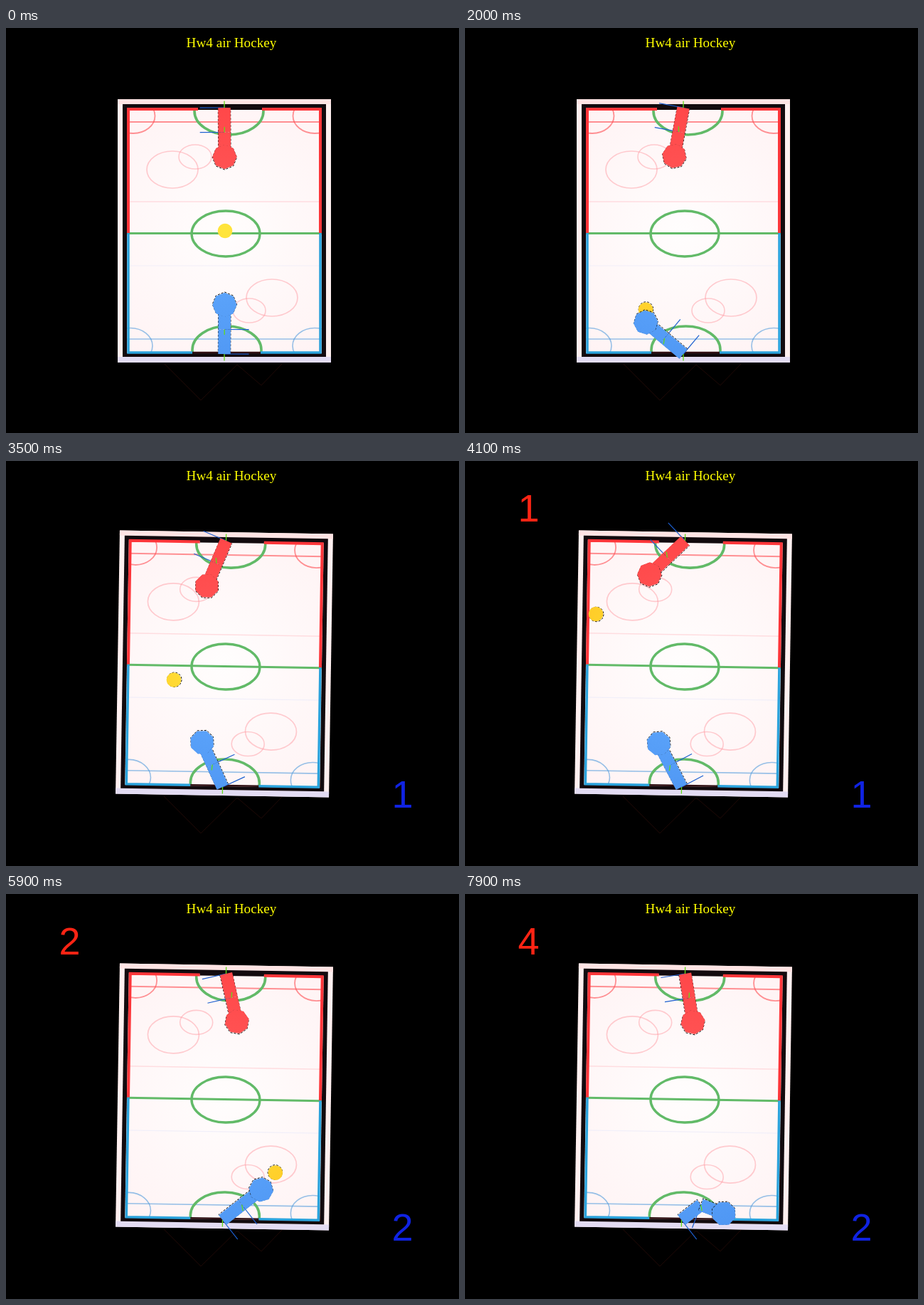
These frames come from a looping animation (637x569 px, 8000 ms). An HTML page with a canvas:

```html
<!DOCTYPE html>
<html lang="en">
<head>
<meta charset="utf-8">
<title>Air Hockey</title>
<style>
html, body { margin: 0; width: 100%; height: 100%; overflow: hidden; background: #000; }
canvas { display: block; }
</style>
</head>
<body>
<canvas id="stage" width="637" height="569"></canvas>
<script>
const ctx = document.getElementById('stage').getContext('2d');
const LOOP = 8000, STEP = 100, LINK = 34.5, LAG = 0.15;
const MID = { x: 307, y: 285 };

// Each shot runs straight and bounces off the walls until the next one starts.
const shot = (step, x, y, vx, vy) => ({ step, x, y, vx, vy });
const faceOff = (step, vx, vy) => shot(step, 308, 285, vx, vy);
const SHOTS = [
  faceOff(0, 0, 0),
  faceOff(12, 41.5, -57.7),
  shot(19.85, 251, 411, 20.6, -101.5),
  faceOff(30, -36, -69.7),
  faceOff(37, -32, 99.5),
  shot(42, 217, 122, 17, 108),
  faceOff(48, 9, 130.5),
  shot(51, 335, 221, 46.6, -85),
  faceOff(56, 23.6, 73.8),
  faceOff(67, -108, -224),
  shot(68, 200, 183, -24, 44),
  faceOff(74, 12, -104),
  shot(78.7, 364, 449, 0, 0)
];
const RED_GOALS = [37, 56, 67, 74], BLUE_GOALS = [30, 48];
const TILT_STEP = 21, TILT = 0.016;

function bounce(v, low, high) {
  const span = high - low, m = (((v - low) % (2 * span)) + 2 * span) % (2 * span);
  return low + (m > span ? 2 * span - m : m);
}

function puckAt(step) {
  const s = SHOTS.filter(s => s.step <= step).pop() || SHOTS[0];
  const t = step - s.step;
  return { x: bounce(s.x + s.vx * t, 182, 440), y: bounce(s.y + s.vy * t, 122, 449) };
}

function glow(inner, outer) {
  const g = ctx.createRadialGradient(MID.x, MID.y, 0, MID.x, MID.y, 220);
  g.addColorStop(0, inner);
  g.addColorStop(1, outer);
  return g;
}
const RED = glow('#ff5c5c', '#ff4244');
const BLUE = glow('#64acff', '#4c94f2');
const YELLOW = glow('#ffe53c', '#ffc220');
const ICE = glow('#fffdfd', '#fff3f4');

function rect(color, x1, y1, x2, y2) {
  ctx.fillStyle = color;
  ctx.fillRect(x1, y1, x2 - x1, y2 - y1);
}

function line(color, width, ...pts) {
  ctx.strokeStyle = color;
  ctx.lineWidth = width;
  ctx.beginPath();
  for (let i = 0; i < pts.length; i += 2) ctx.lineTo(pts[i], pts[i + 1]);
  ctx.stroke();
}

function ring(color, width, x, y, rx, ry) {
  ctx.strokeStyle = color;
  ctx.lineWidth = width;
  ctx.beginPath();
  ctx.ellipse(x, y, rx, ry, 0, 0, Math.PI * 2);
  ctx.stroke();
}

function drawMarkings() {
  const pink = 'rgba(255,150,160,.48)', red = 'rgba(255,75,80,.6)';
  const sky = 'rgba(80,155,220,.6)', green = '#62ba68';
  const across = (color, width, y) => line(color, width, 170, y, 444, y);
  ctx.save();
  ctx.beginPath();
  ctx.rect(170, 113, 274, 344);
  ctx.clip();
  across('#ffdde0', 1.5, 244);
  across('#f1eff9', 1.2, 334);
  across(red, 2, 132);
  across(sky, 1.6, 437);
  for (const x of [179, 434]) ring(red, 1.8, x, 123.5, 30.5, 24.5);
  for (const x of [175, 434]) ring(sky, 1.6, x, 446.5, 31, 25);
  across(green, 3, 288.5);
  ring(green, 3.4, 309, 289, 48, 32);
  for (const s of [1, -1]) {
    ring(pink, 1.7, 304 - 70 * s, 289 - 90 * s, 36, 26);
    ring(pink, 1.6, 304 - 38 * s, 289 - 108 * s, 23, 17);
    ring(green, 3.6, 312 + 1.5 * s, 284.5 - 167.5 * s, 48.5, 33);
  }
  ctx.restore();
}

function drawTable(tilted) {
  const black = '#120a0e', edge = '#ff363a', shore = '#2ba3dc';
  ctx.save();
  if (tilted) {
    ctx.translate(MID.x, MID.y);
    ctx.rotate(TILT);
    ctx.translate(-MID.x, -MID.y);
  }
  rect('#fff0f0', 157, 100, 457, 470);
  rect('#ffe4e4', 157, 100, 457, 107);
  rect('#e3dcf3', 157, 462, 457, 470);
  rect(black, 164, 107, 450, 462);
  rect(ICE, 170, 113, 444, 457);
  drawMarkings();
  line(edge, 4, 270, 114, 172, 114, 172, 288);
  line(edge, 4, 360, 114, 442, 114, 442, 288);
  line(shore, 3.5, 262, 456, 172, 456, 172, 288);
  line(shore, 3.5, 358, 456, 442, 456, 442, 288);
  line(black, 3, 270, 113.5, 360, 113.5);
  line('#301014', 2.5, 262, 456, 358, 456);
  ctx.restore();
}

// Fills a polygon with a broken dark rim on the side facing the middle.
function solid(fill, pts) {
  const mx = pts.reduce((s, p) => s + p.x, 0) / pts.length;
  const my = pts.reduce((s, p) => s + p.y, 0) / pts.length;
  const d = Math.hypot(MID.x - mx, MID.y - my);
  const trace = shift => {
    const k = shift / (d || 1);
    ctx.beginPath();
    pts.forEach(p => ctx.lineTo(p.x + (MID.x - mx) * k, p.y + (MID.y - my) * k));
    ctx.closePath();
  };
  if (d > 4) {
    ctx.setLineDash([3, 2]);
    ctx.strokeStyle = '#111';
    ctx.lineWidth = 1;
    trace(0.8);
    ctx.stroke();
    ctx.setLineDash([]);
  }
  trace(0);
  ctx.fillStyle = fill;
  ctx.fill();
}

const along = (p, angle, length) =>
  ({ x: p.x + Math.cos(angle) * length, y: p.y + Math.sin(angle) * length });

const polygon = (p, r, sides, angle) =>
  Array.from({ length: sides }, (_, i) => along(p, angle + i * Math.PI * 2 / sides, r));

function bar(p, q, angle) {
  const side = angle + Math.PI / 2, half = 8.7;
  return [along(p, side, half), along(q, side, half), along(q, side, -half), along(p, side, -half)];
}

// Two links aim at the puck and fold when it is within reach.
function drawArm(fill, base, goal) {
  const dx = goal.x - base.x, dy = goal.y - base.y;
  const reach = Math.max(25, Math.hypot(dx, dy));
  const aim = Math.atan2(dy, dx), fold = Math.acos(Math.min(1, reach / (2 * LINK)));
  const a1 = aim - fold, a2 = aim + fold;
  const joint = along(base, a1, LINK), tip = along(joint, a2, LINK);
  for (const [p, a] of [[base, a1], [joint, a2]]) {
    const end = along(p, a + Math.PI / 2, LINK);
    line('#1c5fd0', 1.2, p.x, p.y, end.x, end.y);
  }
  solid(fill, bar(base, joint, a1));
  solid(fill, bar(joint, tip, a2));
  solid(fill, polygon(tip, 17.2, 8, a2));
  for (const p of [base, joint]) {
    line('#62dc1c', 1.3, p.x, p.y,
      p.x + (p.x - MID.x) * 0.055, p.y + (p.y - MID.y) * 0.055);
  }
}

function text(string, x, y, font, color) {
  ctx.font = font;
  ctx.fillStyle = color;
  ctx.textAlign = 'center';
  ctx.fillText(string, x, y);
}

function drawScore(goals, step, x, y, color) {
  const score = goals.filter(g => g <= step).length;
  if (score) text(score, x, y, '54px "Liberation Sans", Arial, sans-serif', color);
}

function draw(step) {
  const tilted = step >= TILT_STEP, shift = tilted ? 2.5 : 0;
  const puck = puckAt(step);
  // Arms trail the puck slightly; a reset must not leave them aiming at the old spot.
  const seen = puckAt(step - LAG);
  rect('#000', 0, 0, 637, 569);
  text('Hw4 air Hockey', 317, 27, '19.2px "Liberation Serif", Times, serif', '#ff0');
  line('#1e0906', 1, 222, 471, 274, 523, 325, 473, 359, 502, 388, 472);
  drawTable(tilted);
  solid(YELLOW, polygon(puck, 10.3, 20, 0));
  drawArm(RED, { x: MID.x + shift, y: 112 }, seen);
  drawArm(BLUE, { x: MID.x - shift, y: 458 }, seen);
  drawScore(RED_GOALS, step, 89.5, 85, '#ff2414');
  drawScore(BLUE_GOALS, step, 557.5, 486.5, '#1023e2');
}

const start = performance.now();
function tick() {
  const time = Math.max(0, performance.now() - start) % LOOP;
  draw(Math.floor(time / STEP));
  requestAnimationFrame(tick);
}
tick();
</script>
</body>
</html>
```
